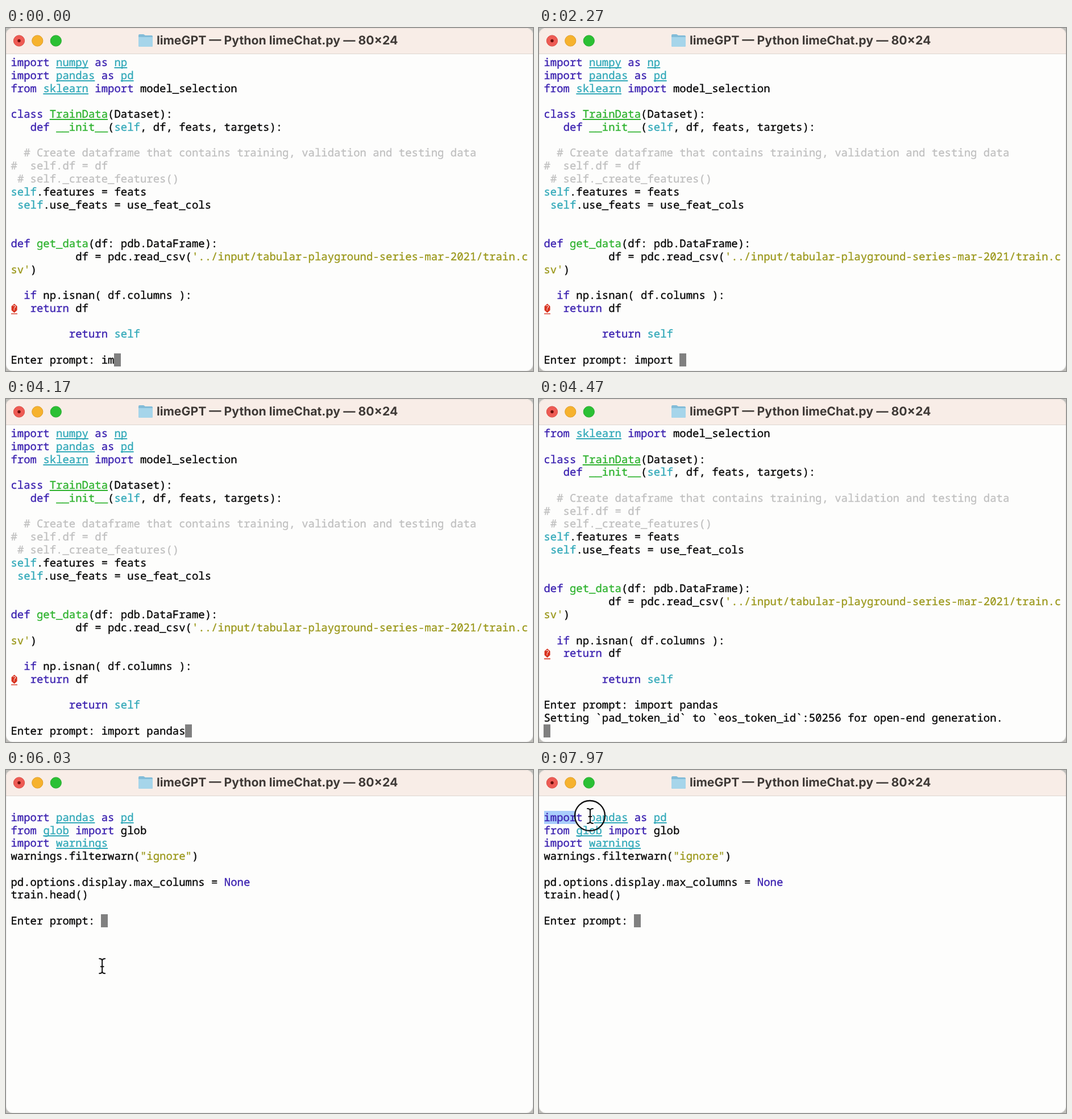
An HTML page for the animation above (8000 ms loop, 927 by 604 pixels).

```html
<!DOCTYPE html>
<html lang="en">
<head>
<meta charset="utf-8">
<title>Terminal</title>
<style>
  html, body { margin: 0; width: 100%; height: 100%; overflow: hidden; background: #bfbeba; }
  #window { position: absolute; left: 0; top: 0; width: 927px; height: 604px; overflow: hidden;
    border-radius: 12px; background: #fdfdfc; text-rendering: geometricPrecision; }
  #window > * { position: absolute; }
  #bar { left: 0; top: 0; width: 927px; height: 45px; background: #f8ede7; border-bottom: 1px solid #ddd5d0; }
  #title { left: 265px; top: 0; font: 700 21.23px/44px Inter, sans-serif; color: #3e3936; white-space: pre; }
  #text { left: 8.5px; top: 49px; margin: 0; color: #080808; -webkit-text-stroke: .35px;
    font: 500 18.97px/22.78px "Noto Sans Mono", "DejaVu Sans Mono", monospace; font-variant-ligatures: none; }
  #caret { width: 11.6px; height: 23px; margin-left: -.4px; background: #808080; }
  #selection { left: 8.5px; top: 71.8px; height: 22.8px; background: #a9cdfb; }
  #overlay { left: 0; top: 0; }
  .k { color: #3b21b0; }
  .c { color: #32a9b9; }
  .g { color: #2fb32f; }
  .n { color: #c0c0c0; }
  .s { color: #9c991d; }
  .u { text-decoration: underline 1.7px; text-underline-offset: 2.4px; text-decoration-skip-ink: none; }
  .bad { vertical-align: top; }
</style>
</head>
<body>
<div id="window">
  <div id="bar"></div>
  <div id="title">limeGPT — Python limeChat.py — 80×24</div>
  <div id="selection"></div>
  <div id="caret"></div>
  <pre id="text"></pre>
  <svg id="overlay" width="927" height="604">
    <circle cx="23" cy="22.5" r="9.6" fill="#ee5b54" stroke="#d94b44"/>
    <circle cx="23" cy="22.5" r="2.7" fill="#6d0f0b"/>
    <circle cx="55.3" cy="22.5" r="9.6" fill="#f6b22e" stroke="#dd9c26"/>
    <circle cx="87.8" cy="22.5" r="9.6" fill="#2bc034" stroke="#25a82d"/>
    <path d="M233 13q0-2 2-2h7l3 2h11q2 0 2 2v16q0 2-2 2h-21q-2 0-2-2z" fill="#83bcd8"/>
    <path d="M233 16h25v15q0 2-2 2h-21q-2 0-2-2z" fill="#a6d5ea"/>
    <rect x=".5" y=".5" width="926" height="603" rx="11.5" fill="none" stroke="#000" stroke-opacity=".06"/>
    <g id="pointer" fill="none" stroke-linecap="round">
      <circle id="ring" cx="-.5" cy="-.5" r="26.5" stroke="#111" stroke-width="2.4"/>
      <g stroke="#fff" stroke-width="4.5"><use href="#beam"/></g>
      <g stroke="#111" stroke-width="2">
        <path id="beam" d="M-5-13Q0-13 0-9V9Q0 13-5 13M5-13Q0-13 0-9M0 9Q0 13 5 13M-2.5 1H2.5"/>
      </g>
    </g>
  </svg>
</div>
<script>
const LOOP = 8000, CELL = 11.382, ROW = 22.78, LEFT = 8.5, TOP = 49, ROWS = 24;
const ENTER = 4280, MESSAGE = 4400, OUTPUT = 5200, POINTER = 5250, PRESS = 7480;
const PROMPT = 'Enter prompt: ', TYPED = 'import pandas';
const $ = id => document.getElementById(id);

// {classes text} marks a coloured run; {!} is the invalid-character glyph.
const code = `{k import} {cu numpy} {k as} {cu np}
{k import} {cu pandas} {k as} {cu pd}
{k from} {cu sklearn} {k import} model_selection

{k class} {gu TrainData}(Dataset):
   {k def} {g __init__}({c self}, df, feats, targets):

  {n # Create dataframe that contains training, validation and testing data}
{n #  self.df = df}
 {n # self._create_features()}
{c self}.features = feats
 {c self}.use_feats = use_feat_cols


{k def} {g get_data}(df: pdb.DataFrame):
          df = pdc.read_csv({s '../input/tabular-playground-series-mar-2021/train.c}
{s sv'})

  {k if} np.isnan( df.columns ):
{!}  {k return} df

         {k return} {c self}
`.split('\n');

const output = `
{k import} {cu pandas} {k as} {cu pd}
{k from} {cu glob} {k import} glob
{k import} {cu warnings}
warnings.filterwarn({s "ignore"})

pd.options.display.max_columns = {k None}
train.head()
`.split('\n');

const badGlyph = `<svg class="bad" width="${CELL}" height="22.5" viewBox="0 0 ${CELL} 22.5">` +
  '<path d="M5.6 3.5L10.6 8v7L5.6 19.5L.6 15V8z" fill="#d8321f"/>' +
  '<text x="5.6" y="15.5" text-anchor="middle" font-size="12" fill="#fff" style="-webkit-text-stroke:0">?</text>' +
  '<path d="M0 21.5H11.4" stroke="#d8321f" stroke-width="1.7"/></svg>';

const markup = line => line
  .replace(/\{(\w+) (.*?)\}/g, (_, names, text) => `<span class="${[...names].join(' ')}">${text}</span>`)
  .replace('{!}', badGlyph);

function terminalLines(t) {
  if (t >= OUTPUT) return [...output, PROMPT];
  const count = 2 + Math.max(0, Math.floor((t - 100) / 365));
  const lines = [...code, PROMPT + TYPED.slice(0, count)];
  if (t >= MESSAGE) lines.push('Setting `pad_token_id` to `eos_token_id`:50256 for open-end generation.');
  if (t >= ENTER) lines.push('');
  return lines.slice(-ROWS);
}

// Pointer stops: time, x, y
const stops = [[5250, 247, 524], [5370, 245, 520], [6800, 74, 126], [6870, 73, 124],
  [7350, 10, 82], [7600, 10, 82], [7970, 90, 81]];

function pointerAt(t) {
  const next = stops.findIndex(stop => stop[0] > t);
  if (next === 0) return stops[0].slice(1);
  if (next < 0) return stops.at(-1).slice(1);
  const [t0, x0, y0] = stops[next - 1], [t1, x1, y1] = stops[next];
  const u = (t - t0) / (t1 - t0), e = u * u * (3 - 2 * u);
  return [x0 + (x1 - x0) * e, y0 + (y1 - y0) * e];
}

let shown;
function render(t) {
  const lines = terminalLines(t), html = lines.map(markup).join('\n');
  if (html !== shown) $('text').innerHTML = shown = html;

  $('caret').style.left = LEFT + lines.at(-1).length * CELL + 'px';
  $('caret').style.top = TOP + (lines.length - 1) * ROW + 'px';

  const [x, y] = pointerAt(t);
  $('pointer').setAttribute('transform', `translate(${x} ${y})`);
  $('pointer').style.display = t >= POINTER ? '' : 'none';
  $('ring').style.display = t >= PRESS ? '' : 'none';

  // The highlight trails the pointer slightly.
  const cells = t >= PRESS ? Math.max(0, Math.floor((pointerAt(t - 120)[0] - LEFT) / CELL)) : 0;
  $('selection').style.width = cells * CELL + 'px';
}

const start = performance.now();
(function tick() {
  render((performance.now() - start) % LOOP);
  requestAnimationFrame(tick);
})();
</script>
</body>
</html>
```
